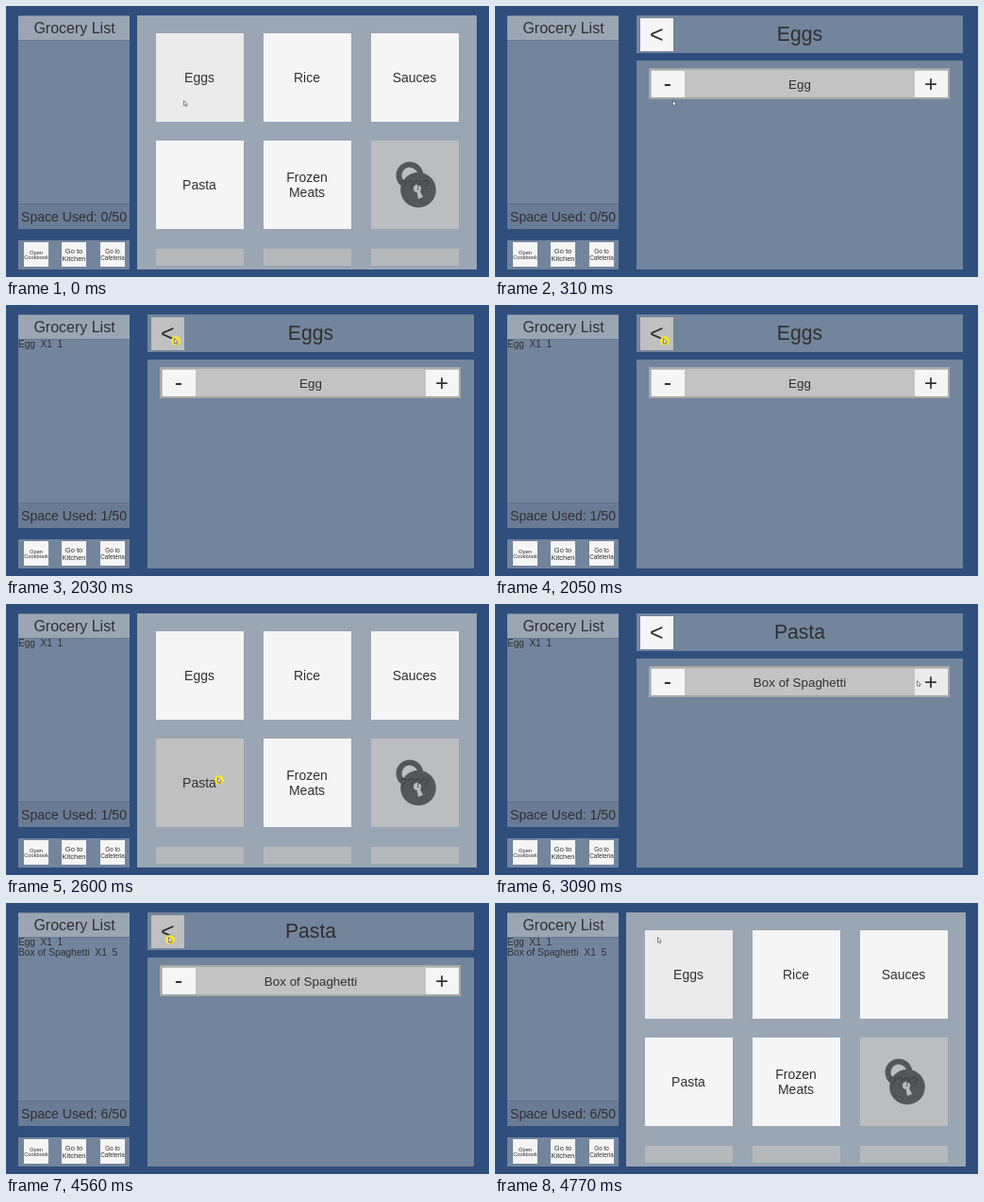
Recreate the animation shown at these times as an HTML page with a canvas. Size 512 by 288 pixels, loop 4850 ms.

```html
<!DOCTYPE html>
<html lang="en">
<head>
<meta charset="utf-8">
<title>Grocery list</title>
<style>
  html, body { margin: 0; width: 100%; height: 100%; overflow: hidden; background: #2f4e7c; }
  canvas { display: block; }
</style>
</head>
<body>
<canvas id="stage" width="512" height="288"></canvas>
<script>
const ctx = document.getElementById('stage').getContext('2d');
const LOOP = 4850;
const PANEL = '#73859d', INK = '#303030';

// Pointer rests: time, x, y
const path = [
  [0, 188, 100], [550, 188, 100], [1060, 472, 88], [1400, 472, 88], [1960, 178, 35],
  [2230, 178, 35], [2560, 224, 184], [2690, 224, 184], [3090, 447, 81], [3280, 456, 90],
  [3638, 456, 90], [4310, 172, 36], [LOOP, 172, 36]
];
const clicks = [[180, 260], [1150, 1230], [1990, 2070], [2580, 2660], [3330, 3410], [4560, 4640]];
const pages = [[0, ''], [260, 'Eggs'], [2070, ''], [2660, 'Pasta'], [4640, '']];
const foods = { Eggs: 'Egg', Pasta: 'Box of Spaghetti' };

let pointer, pressed;

function pointerAt(t) {
  const i = path.findIndex(p => p[0] > t);
  const [t0, x0, y0] = path[i - 1], [t1, x1, y1] = path[i];
  const u = (t - t0) / (t1 - t0), s = u * u * (3 - 2 * u);
  return { x: x0 + (x1 - x0) * s, y: y0 + (y1 - y0) * s };
}

function box(x, y, w, h, color) {
  ctx.fillStyle = color;
  ctx.fillRect(x, y, w, h);
}

function text(str, x, y, size, align = 'center', color = INK) {
  ctx.font = `${size}px "Liberation Sans", Arial, sans-serif`;
  ctx.textAlign = align;
  ctx.fillStyle = color;
  ctx.fillText(str, x, y);
}

function button(x, y, w, h) {
  const over = pointer.x >= x && pointer.x <= x + w && pointer.y >= y && pointer.y <= y + h;
  box(x, y, w, h, !over ? '#f5f5f5' : pressed ? '#c0c0c0' : '#ebebeb');
}

function sidebar(t) {
  const egg = t >= 1200, pasta = t >= 3380;
  box(13, 10, 118, 227, PANEL);
  box(13, 11, 118, 25, '#9aa5b4');
  box(13, 36, 118, 1, '#66778f');
  box(13, 210, 118, 27, '#6a7b95');
  box(13, 210, 118, 1, '#5d6e88');
  text('Grocery List', 72.5, 29, 16);
  if (egg) text('Egg  X1  1', 13, 45.3, 10.1, 'left');
  if (pasta) text('Box of Spaghetti  X1  5', 13, 55.8, 10.3, 'left');
  text(`Space Used: ${egg + pasta * 5}/50`, 72, 228.5, 14.1);

  box(13, 249, 118, 31, PANEL);
  [['Open', 'Cookbook', 32, 5.7], ['Go to', 'Kitchen', 72, 7.5], ['Go to', 'Cafeteria', 113, 6.3]]
    .forEach(([top, bottom, x, size]) => {
      button(x - 13, 251, 26, 26);
      text(top, x, 265 - size * .25, size);
      text(bottom, x, 264 + size * .95, size);
    });
}

function lock() {
  ctx.strokeStyle = ctx.fillStyle = '#555657';
  ctx.lineWidth = 6;
  ctx.beginPath();
  ctx.arc(428, 180, 11.5, 2.2, 6.6);
  ctx.stroke();
  ctx.beginPath();
  ctx.arc(437, 195.5, 18.8, 0, 7);
  ctx.fill();
  ctx.fillStyle = '#b9bbbc';
  ctx.beginPath();
  ctx.arc(436, 194, 4, 0, 7);
  ctx.moveTo(435, 195);
  ctx.lineTo(438, 195);
  ctx.lineTo(442, 203);
  ctx.lineTo(437, 205);
  ctx.fill();
}

function menu() {
  box(139, 10, 360, 270, '#9ba6b4');
  [['Eggs'], ['Rice'], ['Sauces'], ['Pasta'], ['Frozen', 'Meats']].forEach((lines, i) => {
    const x = 159 + i % 3 * 114, y = i < 3 ? 29 : 143;
    button(x, y, 93, 94);
    lines.forEach((line, k) =>
      text(line, x + 46, y + 52 + (k - (lines.length - 1) / 2) * 16, 14));
  });
  box(387, 143, 93, 94, '#bbbdbe');
  lock();
  text('????', 433, 195, 14, 'center', '#414243');
  for (let i = 0; i < 3; i++) box(159 + i * 114, 258, 93, 18, '#b6b9bb');
}

function shop(title) {
  box(150, 10, 346, 40, PANEL);
  button(154, 13, 35, 35);
  text('<', 171.3, 38.5, 25);
  text(title, 323, 37, 21.2);
  box(150, 58, 346, 222, PANEL);
  box(163, 66, 319, 33, '#a9aaa6');
  box(165, 68, 315, 29, '#c3c3c3');
  button(166, 69, 35, 28);
  button(445, 69, 35, 28);
  text('-', 183, 91, 25);
  text('+', 462, 91, 24);
  text(foods[title], 323, 87.5, 13.4);
}

function drawPointer() {
  const { x, y } = pointer;
  if (pressed) {
    ctx.fillStyle = '#f0e23c';
    ctx.beginPath();
    ctx.arc(x + 2, y + 3, 5, 0, 7);
    ctx.fill();
  }
  ctx.beginPath();
  [[.5, .5], [.5, 6], [1.8, 5], [2.7, 6.8], [3.5, 6.3], [2.8, 4.7], [4.2, 4.4]]
    .forEach(([dx, dy]) => ctx.lineTo(x + dx, y + dy));
  ctx.closePath();
  ctx.fillStyle = '#fff';
  ctx.fill();
  ctx.strokeStyle = '#555';
  ctx.lineWidth = .7;
  ctx.stroke();
}

function draw(now) {
  const t = now % LOOP;
  pointer = pointerAt(t);
  pressed = clicks.some(([down, up]) => t >= down && t < up);
  const page = pages.filter(p => p[0] <= t).pop()[1];
  box(0, 0, 512, 288, '#2f4e7c');
  sidebar(t);
  if (page) shop(page);
  else menu();
  drawPointer();
  requestAnimationFrame(draw);
}

draw(0);
</script>
</body>
</html>
```
